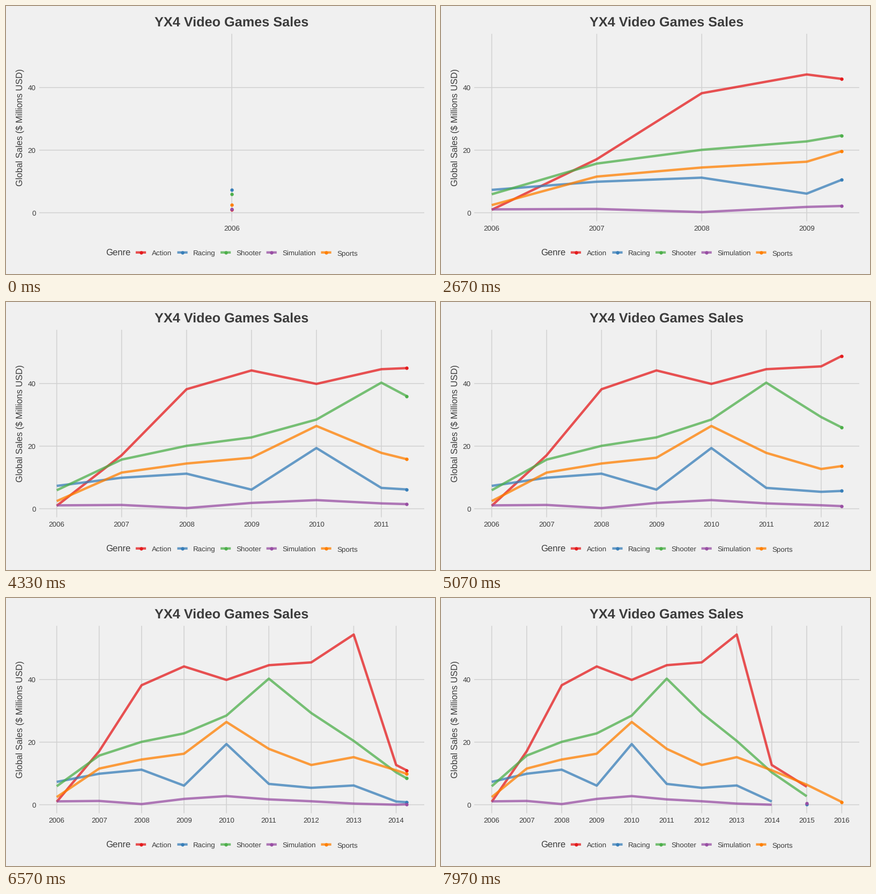
Animation, 800 px wide and 500 px high, one loop 10000 ms. Source, as a matplotlib script:

```python
import matplotlib.pyplot as plt
import numpy as np
from matplotlib.animation import FuncAnimation

plt.rcParams.update({
    "font.family": "Liberation Sans",
    "text.color": "#3C3C3C",
    "text.hinting": "none",
    "path.snap": False,
})

BACKGROUND, GRID = "#F0F0F0", "#D2D2D2"
LEFT, RIGHT, TOP, BOTTOM = 62, 780, 51.9, 401.6
ZERO_Y, UNIT = 385.65, 5.836
DATA_LEFT, DATA_WIDTH = 94.6, 652.7
FIRST_YEAR = 2006
FRAMES, LAST_STEP = 300, 239
LINE_WIDTH, POINT_SIZE, ALPHA = 3.2, 4.6, 0.75

# genre: colour, yearly sales, legend key centre
GENRES = {
    "Action": ("#E41A1C", [0.93, 17.1, 38.2, 44.2, 39.9, 44.6, 45.5, 54.4, 12.7, 5.75], 251.5),
    "Racing": ("#377EB8", [7.3, 9.9, 11.2, 6.1, 19.4, 6.65, 5.4, 6.15, 1.02, 0.15], 329),
    "Shooter": ("#4DAF4A", [5.9, 15.7, 20.1, 22.8, 28.5, 40.3, 29.3, 20.4, 10.35, 2.7], 409.6),
    "Simulation": ("#984EA3", [1.07, 1.2, 0.2, 1.85, 2.75, 1.7, 1.1, 0.35, 0.0, 0.5], 495.2),
    "Sports": ("#FF7F00", [2.43, 11.55, 14.45, 16.3, 26.45, 17.85, 12.7, 15.2, 11.0, 6.4, 0.87], 597),
}
# Genres that keep a lone marker for their final year once they have ended
LONE_MARKER = {"Racing", "Simulation"}

YEARS = np.arange(11)
YEAR_STEPS = np.round(LAST_STEP * YEARS / 10)

fig = plt.figure(figsize=(8, 5), dpi=100, facecolor=BACKGROUND)
ax = fig.add_axes([0, 0, 1, 1])
ax.set(xlim=(0, 800), ylim=(500, 0))
ax.axis("off")


def label(x, y, text, px, **kwargs):
    return ax.text(x, y, text, fontsize=px * 0.72, **kwargs)


def grid_line(xs, ys):
    return ax.plot(xs, ys, color=GRID, lw=1.16, solid_capstyle="butt", zorder=1)[0]


def stroke(xs, ys, color):
    return ax.plot(xs, ys, color=color, lw=LINE_WIDTH, alpha=ALPHA, zorder=2,
                   solid_capstyle="butt", solid_joinstyle="round")[0]


def marker(xs, ys, color):
    return ax.plot(xs, ys, "o", color=color, ms=POINT_SIZE, mew=0, zorder=3)[0]


def to_y(value):
    return ZERO_Y - UNIT * np.asarray(value)


def to_x(year, now):
    if now == 0:
        return np.full(np.shape(year), (LEFT + RIGHT) / 2)
    return DATA_LEFT + DATA_WIDTH * np.asarray(year) / now


label(421, 38, "YX4 Video Games Sales", 25.2, ha="center", weight="bold")
label(33, 226.7, "Global Sales ($ Millions USD)", 16.67, rotation=90,
      ha="right", va="center").set(ha="left", va="center", x=19)
label(186, 466, "Genre", 16.67)

for value in (0, 20, 40):
    y = to_y(value)
    grid_line([LEFT, RIGHT], [y, y])
    label(55.5, y + 4.8, str(value), 13.33, ha="right")

lines, points = {}, {}
for name, (color, _, key_x) in GENRES.items():
    stroke([key_x - 9.6, key_x + 9.6], [459.8, 459.8], color)
    marker([key_x], [459.8], color)
    label(key_x + 20, 465, name, 13.33)
    lines[name] = stroke([], [], color)
    points[name] = marker([], [], color)

ticks = [(grid_line([], []), label(0, 419, str(FIRST_YEAR + k), 13.33, ha="center"))
         for k in YEARS]


def reveal(name, sales, now):
    """Return the drawn years and sales, and the marker position or None."""
    end = len(sales) - 1
    years = np.arange(end + 1)
    if now > end:
        if name in LONE_MARKER:
            return years[:-1], sales[:-1], (end, sales[-1])
        return years, sales, None
    head = np.interp(now, years, sales)
    past = years[years < now]
    return np.append(past, now), np.append(sales[:len(past)], head), (now, head)


def update(frame):
    now = np.interp(min(frame, LAST_STEP), YEAR_STEPS, YEARS)
    for k, (line, text) in zip(YEARS, ticks):
        shown = k <= now * 1.05 + 1e-6
        line.set_visible(shown)
        text.set_visible(shown)
        if shown:
            x = float(to_x(k, now))
            line.set_data([x, x], [TOP, BOTTOM])
            text.set_x(x)
    for name, (_, sales, _) in GENRES.items():
        years, values, head = reveal(name, sales, now)
        lines[name].set_data(to_x(years, now), to_y(values))
        if head:
            points[name].set_data([to_x(head[0], now)], [to_y(head[1])])
        else:
            points[name].set_data([], [])
    return []


animation = FuncAnimation(fig, update, frames=FRAMES, interval=10000 / FRAMES,
                          init_func=lambda: [], repeat=True, repeat_delay=0)
plt.show()
```
